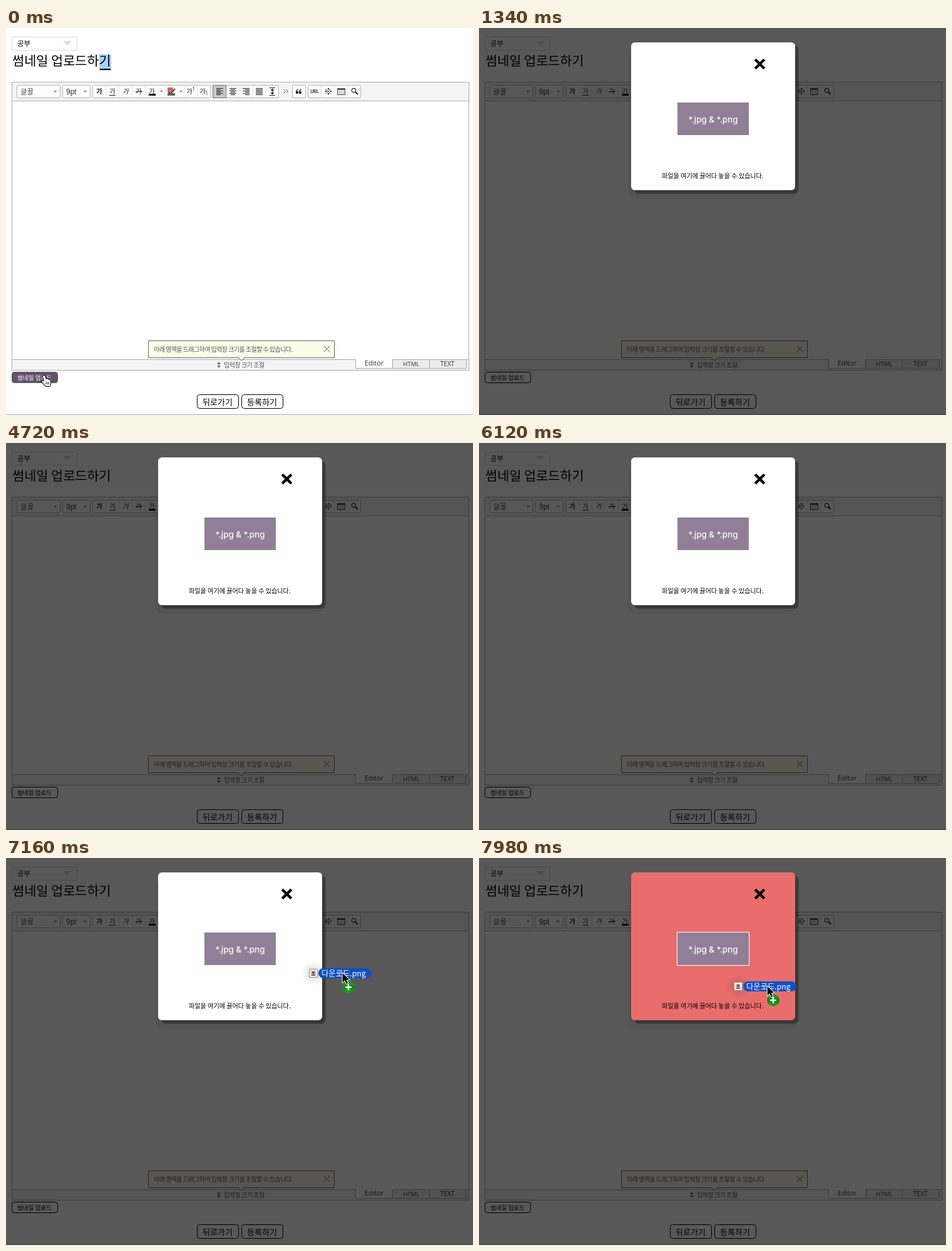
These frames come from a looping animation (746 px wide and 618 px high, 8000 ms). An HTML page with a canvas:

```html
<!DOCTYPE html>
<html lang="ko">
<head>
<meta charset="utf-8">
<style>
html, body { margin: 0; width: 100%; height: 100%; overflow: hidden; background: #fff; }
canvas { display: block; }
</style>
</head>
<body>
<canvas id="stage" width="746" height="618"></canvas>
<script>
const ctx = document.getElementById('stage').getContext('2d');
const LOOP = 8000;
const KR = '"Noto Sans CJK KR", "Noto Sans CJK", sans-serif';
const UI = 'Inter, "Noto Sans CJK KR", sans-serif';

// Helpers
function rect(x, y, w, h, fill) {
  ctx.fillStyle = fill;
  ctx.fillRect(x, y, w, h);
}

function box(x, y, w, h, fill, stroke, radius = 0) {
  ctx.beginPath();
  ctx.roundRect(x + 0.5, y + 0.5, w - 1, h - 1, radius);
  if (fill) { ctx.fillStyle = fill; ctx.fill(); }
  if (stroke) { ctx.strokeStyle = stroke; ctx.lineWidth = 1; ctx.stroke(); }
}

function panel(x, y, w, h, radius, fill) {
  ctx.beginPath();
  ctx.roundRect(x, y, w, h, radius);
  ctx.fillStyle = fill;
  ctx.fill();
}

function text(str, x, y, size, { color = '#000', weight = 400, family = KR, align = 'left', spacing = 0 } = {}) {
  ctx.font = `${weight} ${size}px ${family}`;
  ctx.textAlign = align;
  ctx.letterSpacing = spacing + 'px';
  ctx.fillStyle = color;
  ctx.fillText(str, x, y);
  ctx.letterSpacing = '0px';
}

function line(points, color, width = 1) {
  ctx.beginPath();
  points.forEach(([x, y]) => ctx.lineTo(x, y));
  ctx.strokeStyle = color;
  ctx.lineWidth = width;
  ctx.stroke();
}

function poly(points, fill, stroke, width = 1) {
  ctx.beginPath();
  points.forEach(([x, y]) => ctx.lineTo(x, y));
  ctx.closePath();
  if (stroke) {
    ctx.strokeStyle = stroke;
    ctx.lineWidth = width;
    ctx.lineJoin = 'round';
    ctx.stroke();
    ctx.lineJoin = 'miter';
  }
  ctx.fillStyle = fill;
  ctx.fill();
}

function cross(x, y, r, color, width) {
  line([[x - r, y - r], [x + r, y + r]], color, width);
  line([[x + r, y - r], [x - r, y + r]], color, width);
}

const caret = (x, y, w, h, color) => poly([[x - w, y], [x + w, y], [x, y + h]], color);

// Smooth path through [time, x, y] stops
function along(stops, t) {
  const last = stops.length - 1;
  if (t >= stops[last][0]) return stops[last].slice(1);
  let i = 0;
  while (t >= stops[i + 1][0]) i++;
  const slope = (k, c) => {
    const a = stops[Math.max(0, k - 1)], b = stops[Math.min(last, k + 1)];
    return (b[c] - a[c]) / (b[0] - a[0]);
  };
  const a = stops[i], b = stops[i + 1], span = b[0] - a[0];
  const u = Math.max(0, (t - a[0]) / span), v = 1 - u;
  return [1, 2].map(c =>
    (1 + 2 * u) * v * v * a[c] + u * v * v * span * slope(i, c) +
    u * u * (3 - 2 * u) * b[c] - u * u * v * span * slope(i + 1, c));
}

// Page
function header(composing) {
  box(9, 14, 105, 22, '#fff', '#d9d9d9');
  text('공부', 18, 28.5, 11.4, { weight: 500 });
  caret(98, 21, 7, 7, '#dcdcdc');
  if (composing) {
    rect(149, 42, 19, 26, '#a9d1fd');
    rect(150, 65, 17, 2, '#000');
  }
  text('썸네일 업로드하기', 10, 60, 20.8);
}

function textIcons() {
  const ink = '#222';
  const ga = (x, opt) => text('가', x, 105, 10.5, { color: ink, align: 'center', ...opt });
  ga(149, { weight: 900 });
  ga(170);
  rect(165, 107, 10, 1, ink);
  ctx.save();
  ctx.transform(1, 0, -0.25, 1, 26, 0);
  ga(191);
  ctx.restore();
  ga(212);
  rect(207, 101, 11, 1, ink);
  ga(233);
  rect(228, 105, 11, 3, '#000');
  caret(248.5, 100, 2.5, 3, '#888');
  rect(258, 95, 9, 7, '#c66');
  rect(258, 104, 12, 4, '#666');
  line([[259, 103], [264, 104], [270, 97]], '#444', 2);
  caret(279.5, 100, 2.5, 3, '#888');
  ga(293);
  text('1', 298, 100, 7, { family: UI, color: ink });
  ga(314);
  text('1', 319, 107, 7, { family: UI, color: ink });
}

function alignIcons() {
  [[341, 0], [362, 0.5], [383, 1], [404, 2]].forEach(([cx, shift]) => {
    for (let i = 0; i < 6; i++) {
      const w = shift === 2 || i % 2 === 0 ? 11 : 7;
      rect(cx - 5 + Math.round((11 - w) * Math.min(shift, 1)), 96 + i * 2, w, 1, '#222');
    }
  });
  rect(421, 95, 9, 1, '#222');
  rect(421, 107, 9, 1, '#222');
  rect(425, 97, 1, 9, '#222');
  poly([[422.5, 100], [428.5, 100], [425.5, 96.5]], '#222');
  caret(425.5, 103, 3, 3.5, '#222');
}

function toolbar() {
  rect(10, 87, 729, 29, '#f4f4f4');
  rect(10, 116, 729, 1, '#b0b0b0');
  const edge = '#b5b5b5';
  box(17, 91, 70, 21, '#fcfcfc', edge, 1);
  text('글꼴', 23, 105.5, 11.3, { color: '#444' });
  caret(78.5, 100, 3, 3.5, '#999');
  box(90, 91, 45, 21, '#fcfcfc', edge, 1);
  text('9pt', 96, 106, 12, { color: '#333', family: '"Liberation Sans", sans-serif' });
  caret(126.5, 100, 3, 3.5, '#999');

  [[138, 189], [330, 106], [457, 22], [482, 85]].forEach(([x, w]) => box(x, 91, w, 21, '#fcfcfc', edge, 1));
  [159, 180, 201, 222, 253, 284, 305, 373, 394, 415, 503, 524, 545].forEach(x => rect(x, 92, 1, 19, '#e6e6e6'));
  box(330, 91, 22, 21, '#c9c9c9', '#777');
  textIcons();
  alignIcons();

  [443.5, 447.5].forEach(x => line([[x, 98], [x + 3, 101], [x, 104]], '#555'));
  [463, 468].forEach(x => {
    ctx.beginPath();
    ctx.arc(x + 2, 103, 2.2, 0, 7);
    ctx.fillStyle = '#222';
    ctx.fill();
    line([[x + 0.5, 103], [x + 1, 100], [x + 3.5, 98]], '#222', 1.3);
  });
  text('URL', 493, 104, 7, { family: UI, weight: 600, color: '#222', align: 'center' });
  cross(514.5, 101, 4, '#222', 1);
  [[514, 96], [514, 104], [510, 100], [518, 100]].forEach(([x, y]) => rect(x, y, 2, 2, '#222'));
  box(529, 96, 13, 11, '#fff', '#444');
  rect(529, 96, 13, 3, '#555');
  for (let i = 0; i < 3; i++) {
    rect(532 + i * 3, 99, 1, 7, '#bbb');
    rect(530, 101 + i * 2, 11, 1, '#ccc');
  }
  ctx.beginPath();
  ctx.arc(555.5, 99.5, 3.2, 0, 7);
  ctx.strokeStyle = '#222';
  ctx.lineWidth = 1.2;
  ctx.stroke();
  line([[558, 102], [562, 106]], '#222', 2);
}

function footer() {
  rect(10, 530, 729, 16, '#f5f5f5');
  rect(10, 529, 729, 1, '#a8a8a8');
  box(617, 529, 60, 15, '#ececec', '#aaa');
  box(676, 529, 60, 15, '#ececec', '#aaa');
  rect(559, 528, 58, 15, '#fff');
  line([[558.5, 529], [558.5, 543.5], [617.5, 543.5], [617.5, 529]], '#a8a8a8');
  const tab = { family: '"Open Sans", sans-serif', align: 'center', color: '#333' };
  text('Editor', 588, 539, 11, tab);
  text('HTML', 647.5, 540, 9.7, tab);
  text('TEXT', 705, 540, 10.3, tab);
  poly([[337, 537], [343, 537], [340, 533.5]], '#555');
  caret(340, 539, 3, 3.5, '#555');
  text('입력창 크기 조절', 348, 541.5, 10, { color: '#555', spacing: -0.45 });

  box(227, 499, 298, 28, '#fdfce9', '#66665a');
  poly([[371, 526], [381, 526], [376, 531]], '#fdfce9');
  line([[371, 526.5], [376, 531], [381, 526.5]], '#66665a');
  text('아래 영역을 드래그하여 입력창 크기를 조절할 수 있습니다.', 236, 516.5, 10, { color: '#555', weight: 500, spacing: -0.55 });
  cross(512.5, 512.5, 4.5, '#555', 1);
}

function page(t, modalOpen) {
  rect(0, 0, 746, 618, '#fff');
  header(t < 100);
  box(9, 86, 731, 461, '#fff', '#aaa');
  toolbar();
  footer();
  if (modalOpen) box(9, 549, 74, 18, '#fff', '#000', 4);
  else panel(9, 549, 74, 18, 4.5, '#61536a');
  text('썸네일 업로드', 18, 562, 9.6, { color: modalOpen ? '#000' : '#fff' });
  box(305, 585, 67, 23, '#fff', '#000', 4);
  box(376, 585, 67, 23, '#fff', '#000', 4);
  text('뒤로가기', 314, 601.5, 13);
  text('등록하기', 385, 601.5, 13);
  rect(0, 617, 746, 1, '#aaa');
}

function modal(over) {
  rect(0, 0, 746, 618, 'rgba(0,0,0,.655)');
  panel(239, 36, 268, 237, 12, 'rgba(0,0,0,.06)');
  panel(248, 28, 262.5, 236.5, 7, 'rgba(0,0,0,.34)');
  panel(243, 23, 262, 236, 6, over ? '#e96d6d' : '#fff');
  cross(448.5, 57.5, 7.3, '#000', 4.4);
  if (over) rect(316, 118, 116, 54, '#fff');
  rect(317, 119, 114, 52, '#917e97');
  text('*.jpg & *.png', 374, 151, 13.4, { color: '#fff', weight: 500, family: UI, align: 'center' });
  text('파일을 여기에 끌어다 놓을 수 있습니다.', 292, 240, 10.1);
}

// Pointers
function arrow(x, y) {
  const shape = [[0, 0], [0, 15], [3.4, 11.8], [6, 17.2], [8.4, 16], [6, 10.8], [10.6, 10.6]];
  poly(shape.map(([a, b]) => [x + 0.7 + a, y + 0.7 + b]), '#000', '#fff', 2);
}

function hand(x, y) {
  const shape = [[0, 0], [2, 0], [4, 6], [6, 5], [7.5, 6.5], [9.5, 6], [11, 9], [11, 13], [10, 17], [4, 17], [0, 13], [-3, 9.5], [-2, 8], [1.2, 9.5], [-1, 2]];
  poly(shape.map(([a, b]) => [x + a, y + b]), '#fff', '#000', 2);
  [4, 6.2, 8.4].forEach(dx => line([[x + dx, y + 10], [x + dx, y + 14]], '#000', 0.8));
}

function draggedFile(x, y) {
  const glow = ctx.createRadialGradient(x - 46, y + 1, 4, x - 46, y + 1, 20);
  glow.addColorStop(0, 'rgba(0,0,0,.12)');
  glow.addColorStop(1, 'rgba(0,0,0,0)');
  rect(x - 66, y - 19, 40, 40, glow);
  box(x - 53, y - 6, 14, 14, '#f2eeea', '#9a8c88');
  rect(x - 50, y - 3, 8, 8, '#cfc3ba');
  ctx.beginPath();
  ctx.arc(x - 46, y, 2.3, 0, 7);
  ctx.fillStyle = '#6e5c55';
  ctx.fill();
  rect(x - 49, y + 3, 6, 2, '#6e5c55');

  panel(x - 38, y - 7, 84.5, 16, 8, '#1151c2');
  text('다운로드.png', x - 33, y + 5.5, 12.3, { color: '#fff' });

  const cx = x + 10, cy = y + 23;
  const green = ctx.createLinearGradient(0, cy - 10, 0, cy + 10);
  green.addColorStop(0, '#3a9d37');
  green.addColorStop(0.5, '#0d820d');
  green.addColorStop(1, '#1fa81c');
  ctx.beginPath();
  ctx.arc(cx, cy, 10, 0, 7);
  ctx.fillStyle = green;
  ctx.fill();
  rect(cx - 5, cy - 1, 10, 2.4, '#fff');
  rect(cx - 1.2, cy - 5, 2.4, 10, '#fff');
  arrow(x, y);
}

const leavePath = [[1000, 65, 556], [1160, 230, 568], [1340, 585, 619]];
const dragPath = [[6360, 800, 170], [6920, 643, 174], [7160, 537, 183], [7340, 500, 187], [7980, 460, 204]];

function pointer(t) {
  if (t < 500) hand(60, 555);
  else if (t < 720) arrow(60, 555);
  else if (t < 1000) {
    const u = Math.min(1, (t - 720) / 100);
    arrow(60 + 5 * u, 555 + u);
  } else if (t < 1340) arrow(...along(leavePath, t));
}

function draw(t) {
  const open = t >= 500;
  page(t, open);
  const dragging = t >= 6360;
  const [x, y] = dragging ? along(dragPath, t).map(Math.round) : [0, 0];
  if (open) modal(dragging && x < 505);
  pointer(t);
  if (dragging) draggedFile(x, y);
}

const start = performance.now();
function tick() {
  draw((performance.now() - start) % LOOP);
  requestAnimationFrame(tick);
}
tick();
</script>
</body>
</html>
```
